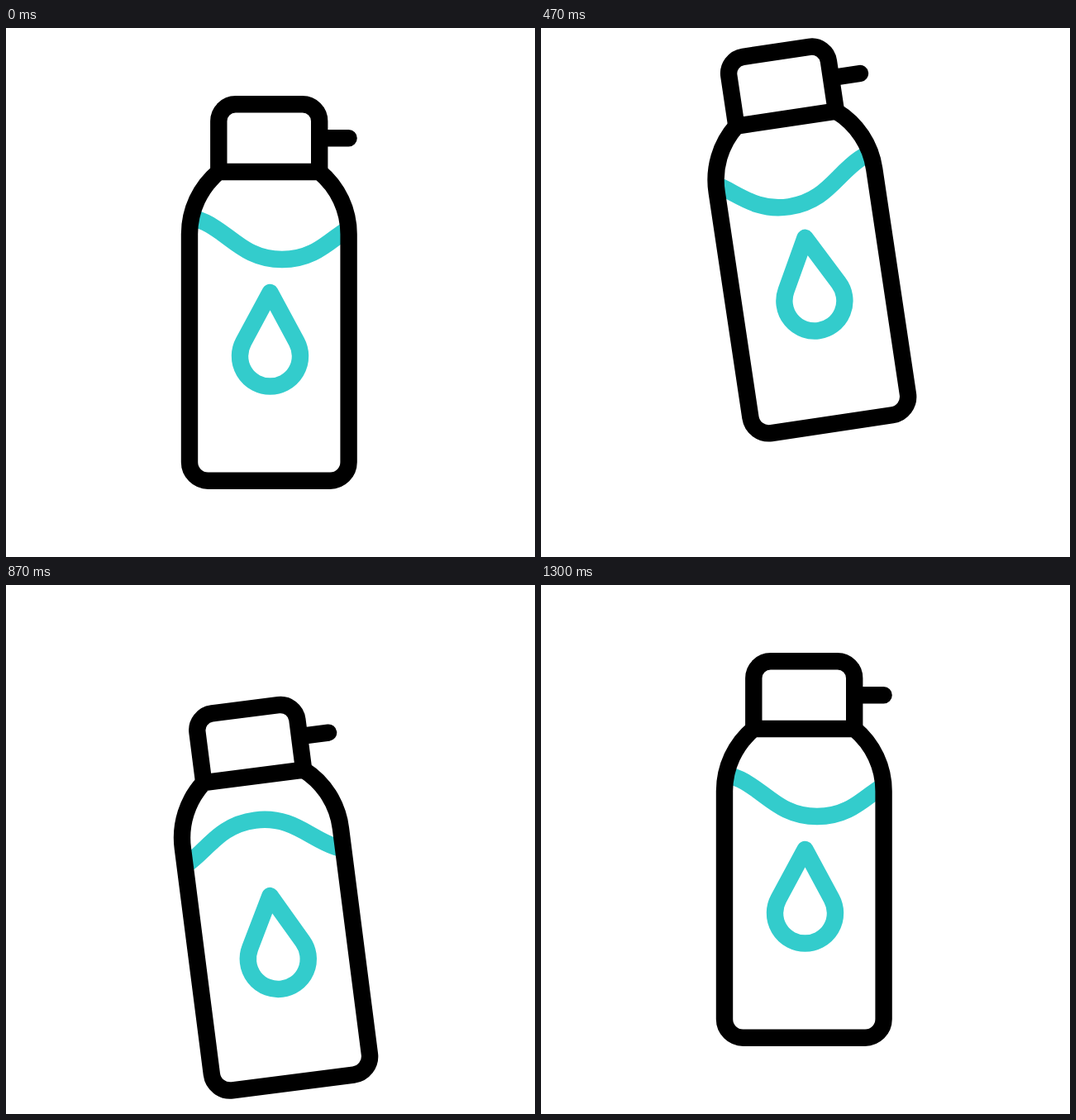
These frames come from a looping animation (640 px wide and 640 px high, 1670 ms). An HTML page:

```html
<!DOCTYPE html>
<html lang="en">
<head>
<meta charset="utf-8">
<title>Shaking bottle</title>
<style>
  html, body { margin: 0; height: 100%; overflow: hidden; background: #fff; }
  svg { display: block; width: 100vw; height: 100vh; }
  g { fill: none; stroke-width: 20.4; stroke-linecap: round; stroke-linejoin: round; }
</style>
</head>
<body>
<svg viewBox="0 0 640 640">
  <clipPath id="inside"><use href="#body"/></clipPath>
  <g id="bottle">
    <g stroke="#3cc">
      <g clip-path="url(#inside)"><path id="wave"/></g>
      <path d="M319.5 320L287.4 379.7A36.5 36.5 0 1 0 351.6 379.7Z"/>
    </g>
    <g stroke="#000">
      <path id="body" d="M257.3 174A98 98 0 0 0 222 250V525.3A22.4 22.4 0 0 0 244.4 547.7H392.2A22.4 22.4 0 0 0 414.6 525.3V250A98 98 0 0 0 379.2 174Z"/>
      <path d="M257.3 174V112.7A20.4 20.4 0 0 1 277.7 92.3H358.8A20.4 20.4 0 0 1 379.2 112.7V174M379.2 133.2H414.6"/>
    </g>
  </g>
</svg>
<script>
  const LOOP = 1670, FRAME = 100 / 3;
  const WAVE = 260, CREST = 227, TROUGH = 280;

  // Keys are [frame, value] pairs, eased in and out between neighbours.
  const tilt = [[0, 0], [10, -30], [18, 13], [26, -7.3], [34, 4.6], [39, 0]];
  const lift = [[0, 0], [15, -67], [26, 56], [39, 0]];
  const drift = [[0, 0], [34, -3 * WAVE]];

  const bottle = document.getElementById('bottle');
  const wave = document.getElementById('wave');

  function valueAt(keys, frame) {
    const next = keys.findIndex(key => key[0] > frame);
    if (next < 0) return keys[keys.length - 1][1];
    const [startFrame, start] = keys[next - 1];
    const [endFrame, end] = keys[next];
    const t = (frame - startFrame) / (endFrame - startFrame);
    return start + (end - start) * t * t * (3 - 2 * t);
  }

  // Each half wave is one S-shaped curve between a trough and a crest.
  function wavePath(shift) {
    const half = WAVE / 2, pull = 0.46 * half;
    let x = 334 + shift % WAVE - WAVE, y = TROUGH;
    let d = `M${x} ${y}`;
    for (let i = 0; i < 6; i++) {
      const nextY = TROUGH + CREST - y;
      d += `C${x + pull} ${y} ${x + half - pull} ${nextY} ${x + half} ${nextY}`;
      x += half;
      y = nextY;
    }
    return d;
  }

  function draw() {
    // The motion steps at 30 frames per second.
    const frame = Math.floor((performance.now() % LOOP + 4) / FRAME);
    bottle.setAttribute('transform',
      `translate(0 ${valueAt(lift, frame)}) rotate(${valueAt(tilt, frame)} 319.3 320)`);
    wave.setAttribute('d', wavePath(valueAt(drift, frame)));
    requestAnimationFrame(draw);
  }
  draw();
</script>
</body>
</html>
```
